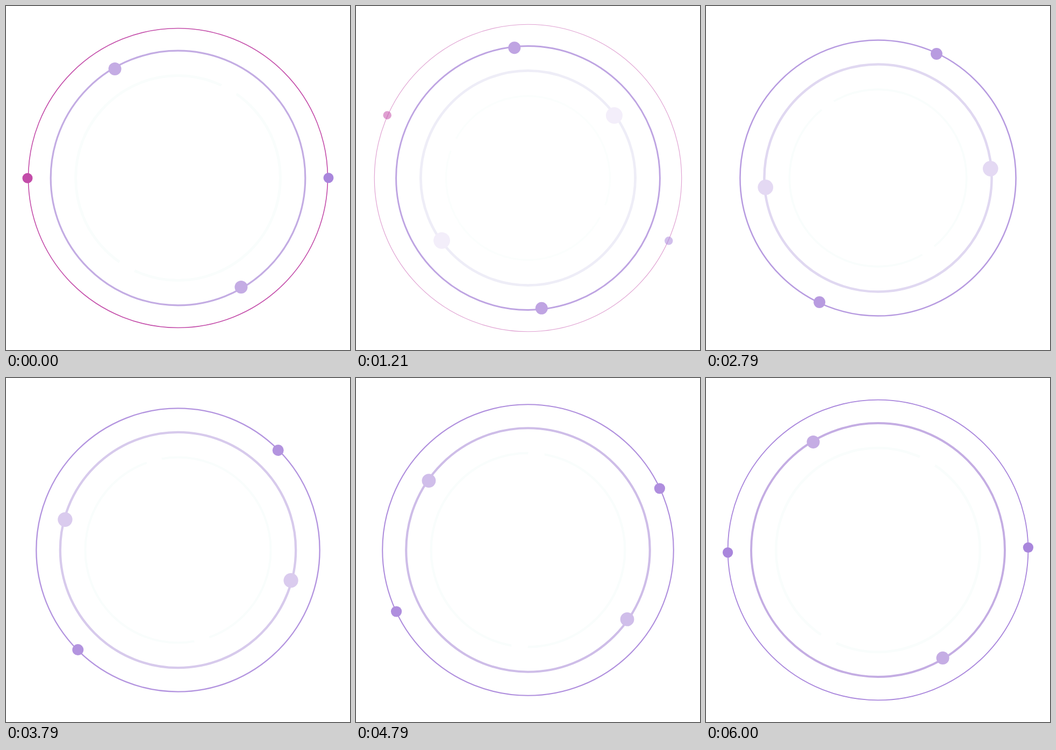
These frames come from a looping animation (640x640 px, 6070 ms). An HTML page:

```html
<!DOCTYPE html>
<html lang="en">
<head>
<meta charset="utf-8">
<title>Expanding orbits</title>
<style>
  html, body { margin: 0; width: 100%; height: 100%; overflow: hidden; background: #fff; }
  svg { display: block; width: 100%; height: 100%; }
</style>
</head>
<body>
<svg id="stage" viewBox="-320 -320 640 640"></svg>
<script>
const LOOP = 6070;
const FPS = 14;
const FADE = 2.57;

const MINT = [249, 253, 252], WHITE = [255, 255, 255];
const LILAC = [195, 172, 227], VIOLET = [169, 134, 220], PINK = [195, 76, 169];

// Each stage of a ring's life lasts one loop; pairs run from start to end.
const stages = [
  { ring: [143, 190.4], orbit: [143, 189], width: [3, 4.7], dot: [11.5, 16.4], angle: 180,
    line: [MINT, MINT], fill: [WHITE, WHITE], alpha: s => Math.min(1, s / 2) },
  { ring: [190.4, 236.5], orbit: [189, 234.8], width: [5, 3.9], dot: [16.3, 12], angle: 240,
    line: [MINT, LILAC], fill: [WHITE, [196, 172, 228]] },
  { ring: [236.8, 279.9], orbit: [234.5, 280], width: [3.2, 1.8], dot: [12, 9.6], angle: 120,
    line: [LILAC, VIOLET], fill: [[196, 172, 228], VIOLET] },
  { ring: [278.5, 314.9], orbit: [280, 313.4], width: [1.6, -0.6], dot: [9.5, 0.7], angle: 0,
    line: [PINK, PINK], fill: [VIOLET, VIOLET], farFill: PINK, fade: true }
];

const svg = document.getElementById("stage");
const mix = ([a, b], p) => a + (b - a) * p;
const tint = ([from, to], p) => `rgb(${from.map((c, i) => Math.round(mix([c, to[i]], p)))})`;

function circle() {
  const node = document.createElementNS("http://www.w3.org/2000/svg", "circle");
  return svg.appendChild(node);
}

function set(node, attrs) {
  for (const name in attrs) node.setAttribute(name, attrs[name]);
}

for (const stage of stages) {
  stage.outline = circle();
  stage.dots = [circle(), circle()];
}

function draw(ms) {
  const tick = Math.floor((Math.floor(ms % LOOP / 10) * 10 + 5) * FPS / 1000);
  const seconds = tick / FPS;
  const p = seconds * 1000 / LOOP;
  const turned = 19.85 * seconds - 0.05;

  for (const stage of stages) {
    const opacity = stage.fade ? Math.max(0, 1 - seconds / FADE) : 1;
    set(stage.outline, {
      r: mix(stage.ring, p),
      fill: "none",
      stroke: tint(stage.line, p),
      "stroke-width": Math.max(0, mix(stage.width, p)),
      opacity: stage.alpha ? stage.alpha(seconds) : opacity
    });
    stage.dots.forEach((dot, i) => {
      const angle = (stage.angle + 180 * i - turned) * Math.PI / 180;
      const orbit = mix(stage.orbit, p);
      set(dot, {
        cx: orbit * Math.cos(angle),
        cy: -orbit * Math.sin(angle),
        r: mix(stage.dot, p),
        fill: i && stage.farFill ? tint([stage.farFill, stage.farFill], p) : tint(stage.fill, p),
        opacity
      });
    });
  }
}

const start = performance.now();
function loop() {
  draw(performance.now() - start);
  requestAnimationFrame(loop);
}
loop();
</script>
</body>
</html>
```
